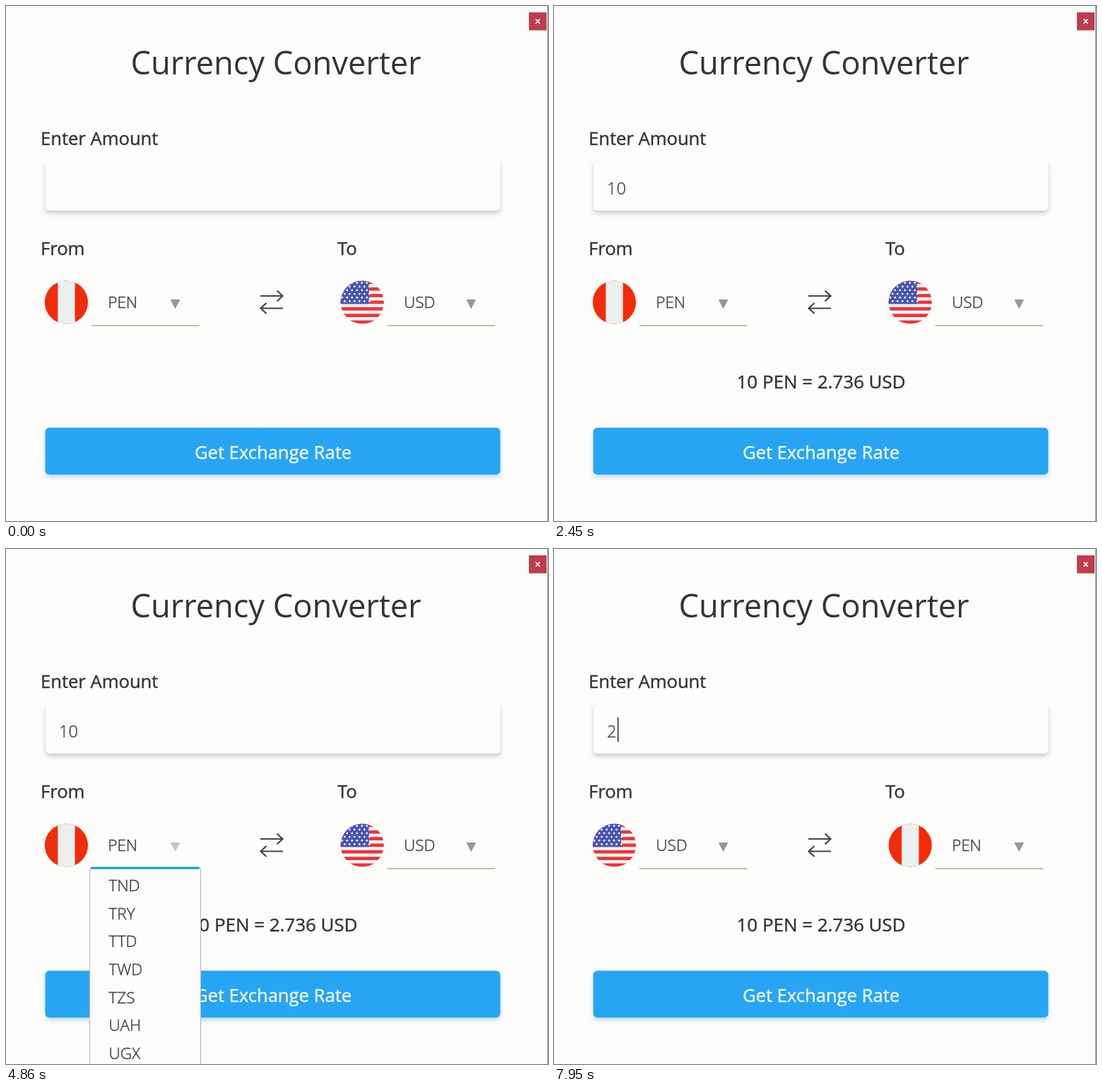
An HTML page that plays this animation: 767x730 px, repeating every 7990 ms.

```html
<!DOCTYPE html>
<html lang="en">
<head>
<meta charset="utf-8">
<title>Currency Converter</title>
<style>
  html, body { margin: 0; width: 100%; height: 100%; overflow: hidden; background: #fcfcfb; }
  svg { display: block; width: 767px; height: 730px; font-family: "Open Sans", "Noto Sans", sans-serif; fill: #333; }
  .title { font-size: 45.2px; }
  .label { font-size: 25.6px; stroke: #333; stroke-width: .4px; }
  .code { font-size: 22.5px; font-weight: 300; fill: #3c3c3c; stroke: #3c3c3c; stroke-width: .4px; }
  .amount { font-size: 23.5px; font-weight: 300; fill: #444; stroke: #444; stroke-width: .35px; }
  .field { fill: #fcfcfb; filter: drop-shadow(0 4px 3px rgba(40, 30, 60, .22)); }
  .button { fill: #28a5f2; filter: drop-shadow(0 4px 3px rgba(40, 130, 210, .25)); }
  .line { stroke: #a8af90; stroke-width: 1.3; }
  .focus { stroke: #12a5cf; stroke-width: 2.7; }
  .fading { stroke: #4fbfd2; stroke-width: 1.5; }
  .icon { fill: none; stroke: #444; stroke-width: 2.2; }
</style>
</head>
<body>
<svg viewBox="0 0 767 730">
  <defs>
    <clipPath id="disc"><circle cx="85.400" cy="420" r="30.6"/></clipPath>
    <clipPath id="buttonClip"><rect x="55.500" y="597.700" width="644" height="66.500" rx="6"/></clipPath>
    <g id="flagPEN" clip-path="url(#disc)">
      <path fill="#f22c08" d="M54 389h63v62H54z"/>
      <path fill="#ecefef" d="M73.300 389h24.300v62H73.300z"/>
    </g>
    <g id="flagUSD" clip-path="url(#disc)">
      <path fill="#f3eeee" d="M54 389h63v62H54z"/>
      <g id="stripes" fill="#e03a40"></g>
      <path fill="#4855b0" d="M54 389h41v33.3H54z"/>
      <g id="stars" fill="#f0f0f8"></g>
    </g>
  </defs>

  <path d="M766.5 0V730" stroke="#8f86a0"/>
  <path d="M740 9h25v25.500h-25z" fill="#bd3d4e"/>
  <path d="M749.500 18.500l6 6.500m0-6.500l-6 6.500" stroke="#fff" stroke-width="1.7"/>

  <text class="title" x="382" y="97" text-anchor="middle">Currency Converter</text>
  <text class="label" x="49" y="197">Enter Amount</text>
  <rect class="field" x="56" y="219" width="643.500" height="71" rx="6"/>
  <text class="amount" id="amount" x="75" y="267"></text>
  <path id="caret" stroke="#222" stroke-width="1.5" d="M0 238.500v35"/>

  <text class="label" x="49" y="353">From</text>
  <text class="label" x="469" y="353">To</text>
  <path class="icon" d="M360 411h32m-8.500-7.500l8 7.500l-8 7.500M392 428.500h-32m8.500-7.500l-8 7.500l8 7.500"/>

  <text class="label" id="result" x="378" y="542" text-anchor="middle" style="font-size:25.9px">10 PEN = 2.736 USD</text>
  <rect class="button" x="55.500" y="597.700" width="644" height="66.500" rx="6"/>
  <g clip-path="url(#buttonClip)"><circle id="ripple" cx="392" cy="633" fill="#fff"/></g>
  <text class="label" x="378" y="642" text-anchor="middle" style="fill:#f2f8fd;stroke:#f2f8fd">Get Exchange Rate</text>
  <g id="combos"></g>
</svg>
<script>
const LOOP = 7990, ROW = 39.67, TOP = 453;
const codes = ("PEN PGK PHP PKR PLN PYG RON RSD RUB SAR SEK SGD THB TJS TMT TND TRY TTD TWD TZS " +
  "UAH UGX USD UYU UZS VND VUV WST XAF XCD").split(" ");
const $ = id => document.getElementById(id);
const set = (el, attrs) => { for (const k in attrs) el.setAttribute(k, attrs[k]); };
const show = (el, on) => { el.style.display = on ? "" : "none"; };
const progress = (t, from, to) => Math.min(1, Math.max(0, (t - from) / (to - from)));

// Value of the last [time, value] pair that has been reached.
const at = (steps, t) => steps.reduce((v, s) => t >= s[0] ? s[1] : v, steps[0][1]);

for (let k = 0; k < 13; k += 2)
  $("stripes").innerHTML += `<rect x="54" y="${389.4 + 4.69 * k}" width="63" height="4.69"/>`;
for (let r = 0; r < 6; r++)
  for (let c = 0; c < 6; c++)
    $("stars").innerHTML += `<circle cx="${57 + 7 * c + (r % 2) * 3.5}" cy="${392.5 + 5.2 * r}" r="1.45"/>`;

function makeCombo(x, spec) {
  const g = document.createElementNS("http://www.w3.org/2000/svg", "g");
  const rows = codes.slice(0, 7).map((_, i) =>
    `<text class="code row" x="145.500" y="${485 + i * ROW}"></text>`).join("");
  g.innerHTML = `<use class="flag"/>
    <text class="code value" x="144.300" y="427.500"></text>
    <path class="arrow" d="M232.700 416h13.600l-6.800 13.500z"/>
    <path class="line" d="M121 453H273.500"/>
    <path class="focus"/>
    <g class="popup">
      <path d="M118.500 ${TOP + .5}H275.500V740H118.500z" fill="#fcfcfb" stroke="#b4b4b4"/>
      <rect class="hover" x="120" width="144" height="39" fill="#ececec"/>
      ${rows}
      <rect class="thumb" x="267" width="6" height="60" rx="3" fill="#aeaeae"/>
      <path d="M120 452.200H273.500" class="focus"/>
    </g>`;
  set(g, { transform: `translate(${x})` });
  $("combos").append(g);
  const part = name => g.querySelector("." + name);
  const rowEls = [...g.querySelectorAll(".row")];
  const focusLine = part("focus");

  return t => {
    const open = t >= spec.open && t < spec.close;
    const value = at(spec.value, t);
    set(part("flag"), { href: "#flag" + value });
    part("value").textContent = value;
    set(part("arrow"), { fill: open ? "#c6c6c6" : "#96969c" });

    const grow = progress(t, spec.open - 120, spec.open + 40);
    const fading = t >= spec.close;
    show(focusLine, t >= spec.open - 120 && t < spec.blur);
    set(focusLine, {
      d: `M${197 - 76 * grow} ${fading ? 453 : 452.2}H${197 + 76.5 * grow}`,
      class: fading ? "fading" : "focus"
    });

    show(part("popup"), open);
    if (!open) return;
    const scroll = at(spec.scroll, t), hover = at(spec.hover, t);
    rowEls.forEach((el, i) => { el.textContent = codes[scroll + i]; });
    show(part("hover"), hover >= 0);
    set(part("hover"), { y: 495 + (hover - 1) * ROW });
    set(part("thumb"), { y: 698 + 2.5 * scroll });
  };
}

const combos = [
  makeCombo(0, {
    open: 2740, close: 5140, blur: 5140,
    value: [[0, "PEN"], [5140, "USD"]],
    scroll: [[0, 0], [3250, 2], [3350, 5], [3450, 8], [3550, 10], [4080, 12], [4280, 14], [4480, 15]],
    hover: [[0, -1], [2880, 0], [2980, 1], [3180, 3], [3330, 5], [3500, 6], [3900, -1]]
  }),
  makeCombo(418.700, {
    open: 5440, close: 5880, blur: 6040,
    value: [[0, "USD"], [5880, "PEN"]],
    scroll: [[0, 22], [5560, 16], [5630, 10], [5700, 4], [5760, 0]],
    hover: [[0, -1], [5520, 1], [5800, 0]]
  })
];

const typed = [[0, ""], [680, "1"], [860, "10"], [7160, "1"], [7320, ""], [7680, "2"]];
const caretOn = [[0, 0], [360, 1], [1250, 0], [6720, 1]];

function draw(t) {
  const amount = at(typed, t);
  $("amount").textContent = amount;
  show($("caret"), at(caretOn, t));
  set($("caret"), { transform: `translate(${77 + 13.6 * amount.length})` });
  show($("result"), t >= 1740);

  const grow = 1 - (1 - progress(t, 1600, 2060)) ** 3;
  set($("ripple"), {
    r: t < 1600 ? 0 : 335 * grow,
    opacity: .15 * (1 - progress(t, 2000, 2300))
  });
  combos.forEach(update => update(t));
}

(function frame() {
  draw(performance.now() % LOOP);
  requestAnimationFrame(frame);
})();
</script>
</body>
</html>
```
